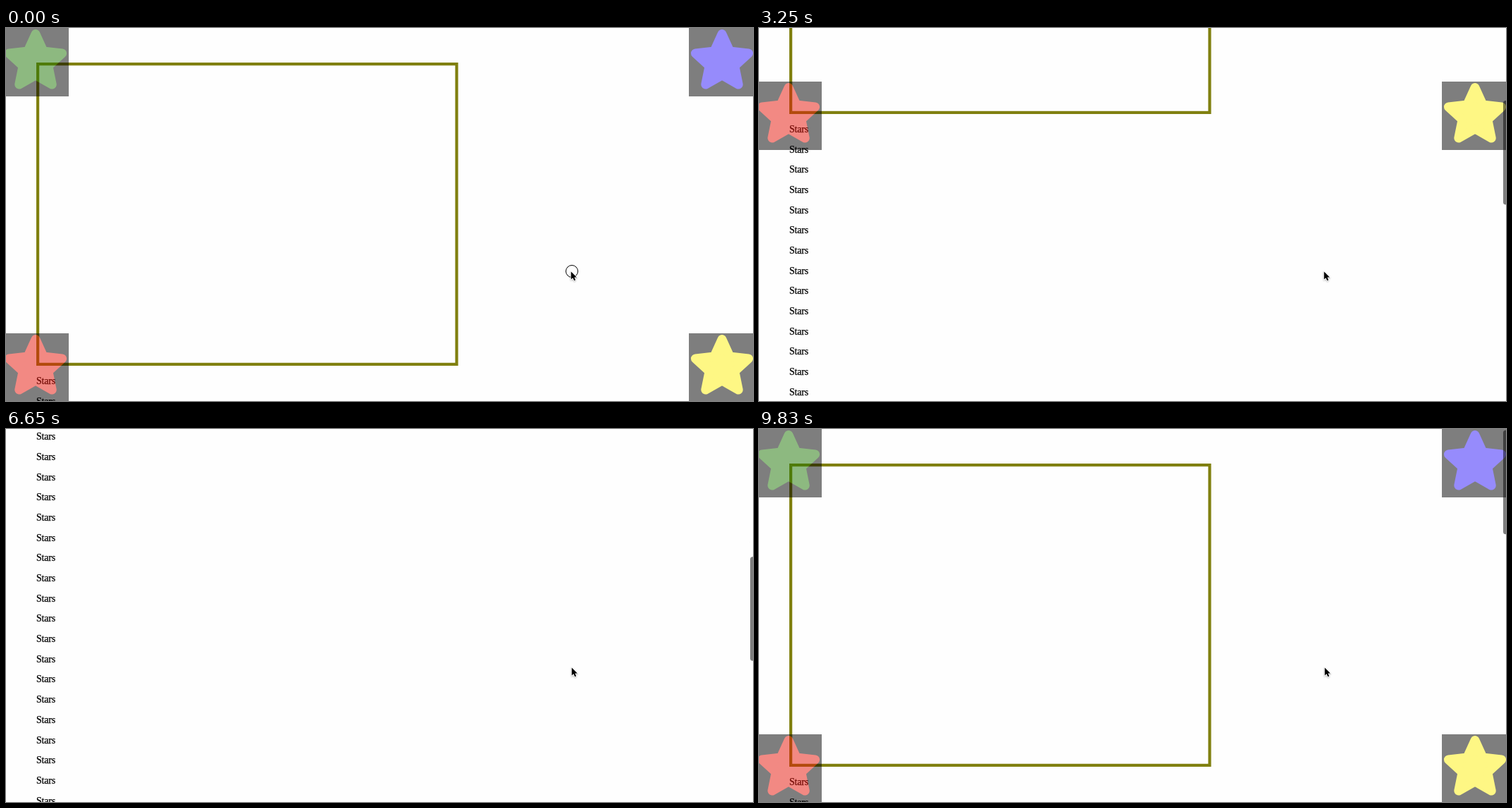
Recreate the animation shown at these times as an HTML page. Size 1060 by 529 pixels, loop 9980 ms.

```html
<!DOCTYPE html>
<html lang="en">
<head>
<meta charset="utf-8">
<title>Stars</title>
<style>
  html, body { margin: 0; width: 100%; height: 100%; overflow: hidden; background: #fefefe; }
  svg { display: block; width: 1060px; height: 529px; }
  text { font: 14px "Liberation Serif", Times, serif; letter-spacing: -.2px; stroke: #000; stroke-width: .25px; }
</style>
</head>
<body>
<svg viewBox="0 0 1060 529">
  <defs>
    <filter id="soft" x="-50%" y="-50%" width="200%" height="200%">
      <feDropShadow dx="0" dy="1" stdDeviation=".8" flood-opacity=".35"/>
    </filter>
  </defs>
  <g id="page">
    <rect x="45.1" y="51.1" width="594.4" height="425.8" fill="none" stroke="#808010" stroke-width="4.2"/>
    <g id="lines"></g>
    <g id="tiles"></g>
  </g>
  <rect id="bar" x="1056" width="8" height="147.6" rx="3.5" fill="#000" fill-opacity=".5"/>
  <circle id="ring" cx="803" cy="345" r="8.5" fill="none" stroke="#000"/>
  <path id="cursor" d="M0 0V11.2L2.6 8.8L4.4 12.8L6.3 12L4.6 8.1H8Z" stroke="#fff" stroke-width="1.2" paint-order="stroke" filter="url(#soft)"/>
</svg>
<script>
const LOOP = 9980, STEP = 140;
const $ = id => document.getElementById(id);

function add(parent, tag, attrs) {
  const el = document.createElementNS("http://www.w3.org/2000/svg", tag);
  for (const key in attrs) el.setAttribute(key, attrs[key]);
  return parent.appendChild(el);
}

for (let i = 0; i < 46; i++) {
  add($("lines"), "text", { x: 43, y: Math.round(504.9 + 28.68 * i) }).textContent = "Stars";
}

// Ten corners alternate between two radii; the thick stroke rounds the tips.
const star = Array.from({ length: 10 }, (_, i) => {
  const r = i % 2 ? 18.8 : 39.5, a = i * Math.PI / 5;
  return [47 + r * Math.sin(a), 48.1 - r * Math.cos(a)];
}).join(" ");

function tile(x, y, color) {
  const g = add($("tiles"), "g", { transform: `translate(${x} ${y})`, opacity: .5 });
  add(g, "rect", { width: 94, height: 97 });
  add(g, "polygon", { points: star, fill: color, stroke: color, "stroke-width": 13, "stroke-linejoin": "round" });
}
tile(-5, 0, "#1f7705");
tile(969, 0, "#311bfb");
tile(-5, 433, "#e7170b");
tile(969, 433, "#fff10d");

// Scroll keys: [ms, px]
const keys = [
  [0, 0], [900, 0], [1550, 61], [3250, 357], [4440, 547], [4830, 580], [5400, 580],
  [6220, 712], [6650, 633], [7550, 424], [7680, 424], [8120, 320], [9830, 0], [LOOP, 0]
];

const linear = p => p;
const easeOut = p => 1 - (1 - p) ** 1.5;

// The page repaints in even steps of about STEP ms between keys.
function scrollAt(t) {
  const i = keys.findIndex(k => k[0] > t);
  const [t0, s0] = keys[i - 1], [t1, s1] = keys[i];
  const steps = Math.round((t1 - t0) / STEP);
  const p = Math.floor(steps * (t - t0) / (t1 - t0)) / steps;
  const ease = t0 === 8120 ? easeOut : linear;
  return Math.round(s0 + (s1 - s0) * ease(p));
}

function render(t) {
  const s = scrollAt(t);
  $("page").setAttribute("transform", `translate(0 ${-s})`);
  $("bar").setAttribute("y", 1.7 + .2836 * s);
  $("bar").style.display = t < 1030 ? "none" : "";
  $("ring").style.display = t < 60 ? "" : "none";
  $("cursor").setAttribute("transform", t < 5540 ? "translate(801.8 345.4)" : "translate(802.8 338.4)");
}

const start = performance.now();
function tick() {
  render((performance.now() - start) % LOOP);
  requestAnimationFrame(tick);
}
tick();
</script>
</body>
</html>
```
